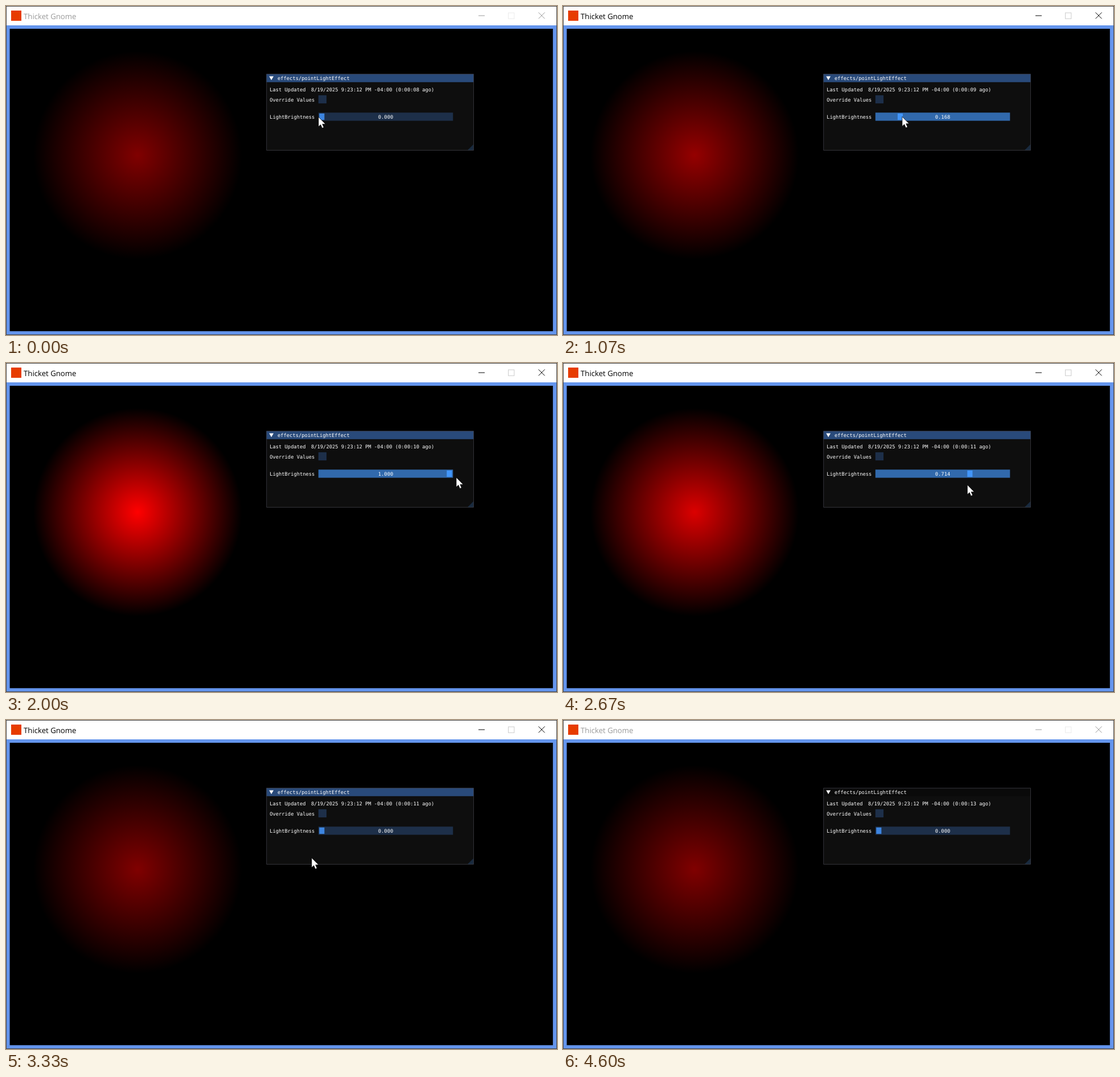
Write an HTML page that moves like this. It is 968 px wide and 578 px high and loops after 4.74 s.

```html
<!DOCTYPE html>
<html lang="en">
<head>
<meta charset="utf-8">
<title>Light panel</title>
<style>
  html, body { margin: 0; width: 100%; height: 100%; overflow: hidden; background: #000; }
  svg { display: block; }
  text { text-rendering: geometricPrecision; }
  .mono { font: 8.78px "DejaVu Sans Mono", monospace; fill: #fff; }
  #caption { font: 13.2px "Open Sans", sans-serif; }
</style>
</head>
<body>
<svg width="968" height="578" viewBox="0 0 968 578">
  <defs>
    <radialGradient id="glow">
      <stop id="core" offset="0"/>
      <stop offset="1" stop-color="#000"/>
    </radialGradient>
  </defs>

  <!-- window -->
  <rect width="968" height="578" fill="#444"/>
  <rect x="1" y="1" width="966" height="33" fill="#fff"/>
  <rect x="1" y="34" width="966" height="543" fill="#6495ed"/>
  <rect x="6.6" y="40" width="954.2" height="531.3"/>
  <rect x="9" y="8" width="18" height="18" fill="#e73c00"/>
  <text id="caption" x="31" y="22.5">Thicket Gnome</text>
  <g fill="none">
    <path id="minimise" d="M830 17h11"/>
    <rect id="maximise" x="882.5" y="12" width="10.3" height="10.3"/>
    <path id="close" d="M935.5 11.3l11 11m0-11l-11 11"/>
  </g>
  <circle cx="231.2" cy="262" r="183" fill="url(#glow)"/>

  <!-- panel -->
  <rect x="457.5" y="119.5" width="364" height="134.3" fill="#0e0e0e"/>
  <rect id="header" x="457.5" y="119.5" width="364" height="14.3"/>
  <path d="M821.3 243v10.6h-10.6z" fill="#192a3e"/>
  <rect x="457.8" y="119.8" width="363.6" height="133.8" fill="none" stroke="#404048" stroke-width=".76"/>
  <path d="M462.3 123.4h7.8l-3.9 6.8z" fill="#fff"/>
  <rect x="548.8" y="156.8" width="14.3" height="14.3" fill="#1d2f49"/>
  <rect id="track" x="548.8" y="187.3" width="236.5" height="14.3"/>
  <rect id="knob" y="188.8" width="9.1" height="11.3"/>
  <g class="mono">
    <text x="477" y="130">effects/pointLightEffect</text>
    <text x="463.2" y="150.4">Last Updated</text>
    <text id="updated" x="536" y="150.4"></text>
    <text x="463.2" y="167.5">Override Values</text>
    <text x="463.2" y="198">LightBrightness</text>
    <text id="value" x="667" y="198" text-anchor="middle"></text>
  </g>

  <path id="cursor" d="M0 0V17L3.8 13.5L6.4 19.6L9.4 18.3L6.8 12.4H12.2Z" fill="#fff" stroke="#000" stroke-width=".7"/>
</svg>
<script>
const LOOP = 4740, FPS = 15;
const LAG = 16.4; // the slider trails the pointer by about one screen refresh
const PRESS = 730, RELEASE = 3330, LEAVE = 3800, BLUR = 4530;
const KNOB_MIN = 555, KNOB_RANGE = 224;

const el = id => document.getElementById(id);
const set = (id, attrs) => {
  for (const name in attrs) el(id).setAttribute(name, attrs[name]);
};
const clamp = v => Math.min(1, Math.max(0, v));

// Gentle ease in and out, halfway between linear and smoothstep.
function ease(t, from, to) {
  const p = clamp((t - from) / (to - from));
  return (p + p * p * (3 - 2 * p)) / 2;
}

// The pointer nudges onto the knob, drags it right, drags it back, then leaves.
function pointer(t) {
  const nudge = ease(t, 70, 330);
  const lift = ease(t, PRESS, 1070);
  const right = ease(t, 810, 1985);
  const back = ease(t, 2300, 3370);
  const exit = ease(t, RELEASE, 3740);
  return {
    x: 549 + 6 * nudge + 236 * right - 259.4 * back - 359 * exit,
    y: 195 + 8 * nudge - 10 * lift + 8 * right + 42 * back + 290 * exit
  };
}

const stepTime = t => Math.round(Math.floor((t + 4) * FPS / 1000) * 100 / FPS) * 10;

function draw(t) {
  const focused = t >= PRESS && t < BLUR;
  const dragging = t >= PRESS && t < RELEASE;
  const { x, y } = pointer(t);
  const light = clamp((pointer(t - LAG).x - KNOB_MIN) / KNOB_RANGE);
  const seconds = 8 + Math.floor((t + 400) / 1000);
  const ink = focused ? "#000" : "#999";

  set("caption", { fill: ink });
  set("minimise", { stroke: ink });
  set("close", { stroke: ink });
  set("maximise", { stroke: focused ? "#ccc" : "#ebebeb" });
  set("core", { "stop-color": `rgb(${Math.round(127.5 * (1 + light))},0,0)` });
  set("header", { fill: t < BLUR ? "#294a7a" : "#0a0a0a" });
  set("track", { fill: dragging ? "#3169ac" : "#1d2f49" });
  set("knob", { x: 550.3 + KNOB_RANGE * light, fill: dragging ? "#4296fa" : "#3d85e0" });
  set("cursor", {
    transform: `translate(${x} ${y})`,
    visibility: t < LEAVE ? "visible" : "hidden"
  });
  el("value").textContent = light.toFixed(3);
  el("updated").textContent =
    `8/19/2025 9:23:12 PM -04:00 (0:00:${String(seconds).padStart(2, "0")} ago)`;
}

const start = performance.now();
function tick() {
  draw(stepTime((performance.now() - start) % LOOP));
  requestAnimationFrame(tick);
}
tick();
</script>
</body>
</html>
```
